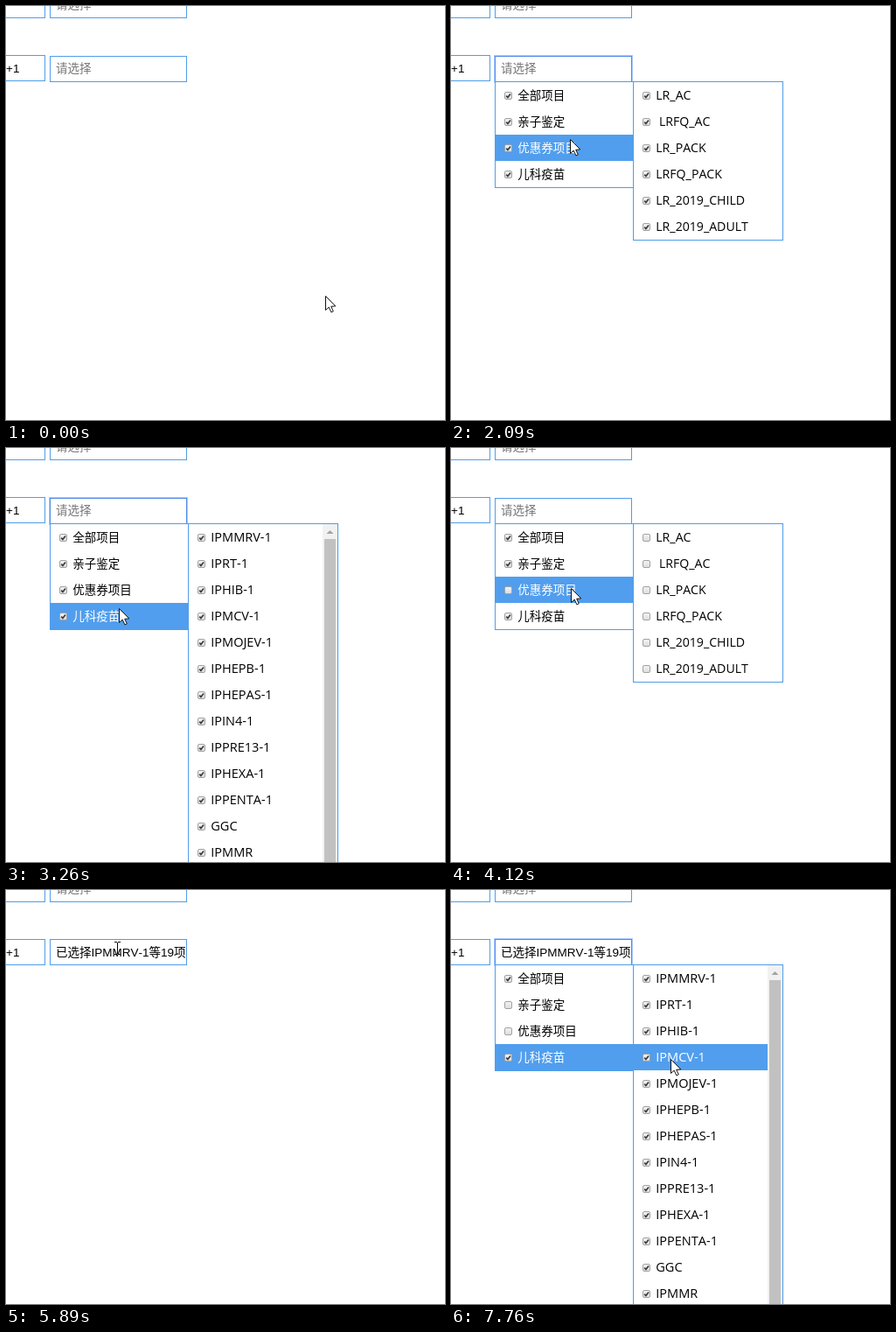
Animation, 502 px wide and 473 px high, one loop 8000 ms. Source, as an HTML page with a canvas:

```html
<!DOCTYPE html>
<html lang="zh">
<head>
<meta charset="utf-8">
<style>
html, body { margin: 0; width: 100%; height: 100%; overflow: hidden; background: #fff; }
canvas { display: block; }
</style>
</head>
<body>
<canvas id="stage" width="502" height="473"></canvas>
<script>
const ctx = document.getElementById('stage').getContext('2d');
const LOOP = 8000, STEP = 78, TICK = 10, PRESS = 160;
const WIDTH = 502, HEIGHT = 473, ROW = 30, LEFT = 50, SPLIT = 208;
const BLUE = '#509de9', HOVER = '#519eee';
const CJK = '"Noto Sans CJK SC", "Noto Sans CJK", sans-serif';
const MENU_FONT = '13.5px ' + CJK;
const INPUT_FONT = '13.5px "Liberation Sans", ' + CJK;
const LIST_FONT = '14.5px "Open Sans", "Noto Sans", sans-serif';
const CODE_FONT = LIST_FONT.replace('14.5', '14.1');

const groups = [
  { name: '全部项目' },
  { name: '亲子鉴定', font: LIST_FONT, items: ['PAT-B-1+1', 'PAT-H-1+1', 'PAT-B', 'PAT-B-SAB', 'PAT-H-SAB'] },
  { name: '优惠券项目', font: CODE_FONT,
    items: ['LR_AC', ' LRFQ_AC', 'LR_PACK', 'LRFQ_PACK', 'LR_2019_CHILD', 'LR_2019_ADULT'] },
  { name: '儿科疫苗', font: LIST_FONT, scroll: true,
    items: ['IPMMRV-1', 'IPRT-1', 'IPHIB-1', 'IPMCV-1', 'IPMOJEV-1', 'IPHEPB-1', 'IPHEPAS-1',
      'IPIN4-1', 'IPPRE13-1', 'IPHEXA-1', 'IPPENTA-1', 'GGC', 'IPMMR'] }
];

// The pointer's journey; everything else follows from where it is and when it clicks.
const moves = [];
function move(from, to, x, y, click) {
  moves.push({ from, to, x, y, click, start: moves.at(-1) || { x: 365, y: 331 } });
}
move(0, 680, 127, 75, 920);
move(1150, 1290, 135, 113);
move(1290, 1460, 141, 139);
move(1460, 1600, 220, 142);
move(1600, 1700, 238, 188);
move(1700, 1940, 142, 138);
move(2010, 2090, 136, 152);
move(2090, 2250, 182, 148);
move(2640, 2720, 133, 148);
move(2790, 2950, 133, 135);
move(2950, 3110, 134, 160);
move(3180, 3260, 129, 183);
move(3570, 3650, 137, 160, 4110);
move(4110, 4260, 138, 132, 4500);
move(4570, 4820, 136, 257, 5130);
move(5130, 5730, 127, 66, 6060);
move(6430, 6670, 157, 121);
move(6750, 7080, 185, 190);
move(7080, 7760, 251, 193);

function pointerAt(t) {
  const { from, to, x, y, start } = moves.findLast(m => m.from <= t);
  const steps = Math.round((to - from) / STEP);
  const k = Math.min(1, Math.floor((t - from) / (to - from) * steps) / steps);
  return { x: Math.round(start.x + (x - start.x) * k), y: Math.round(start.y + (y - start.y) * k) };
}

const inputTop = ui => ui.picked ? 56 : 57;
const menuTop = ui => inputTop(ui) + 29;
const rowAt = (ui, y) => Math.floor((y - menuTop(ui) - 1) / ROW);

function overInput(ui, { x, y }) {
  return x >= LEFT && x < 207 && y >= inputTop(ui) && y < menuTop(ui);
}

function point(ui, { x, y }) {
  const row = rowAt(ui, y);
  if (!ui.open || row < 0) return;
  if (x >= SPLIT) {
    if (groups[ui.hover]?.items?.[row]) ui.hot[ui.hover] = row;
  } else if (x >= LEFT && row < groups.length) ui.hover = row;
}

function release(ui, pointer) {
  if (overInput(ui, pointer)) ui.open = true;
  else if (rowAt(ui, pointer.y) < groups.length) ui.off.add(ui.hover);
  else Object.assign(ui, { open: false, picked: true, hover: -1 });
}

// Replays the interaction from the start of the loop up to time t.
function replay(t) {
  const ui = { open: false, focus: false, picked: false, pressed: false, hover: -1, hot: {}, off: new Set() };
  for (let s = 0; ; s = Math.min(s + TICK, t)) {
    const pointer = ui.pointer = pointerAt(s);
    const pressed = moves.some(m => m.click && s >= m.click - PRESS && s < m.click);
    if (pressed) ui.focus = overInput(ui, pointer);
    else if (ui.pressed) release(ui, pointer);
    ui.pressed = pressed;
    point(ui, pointer);
    if (s >= t) return ui;
  }
}

function fill(color, x, y, w, h) {
  ctx.fillStyle = color;
  ctx.fillRect(x, y, w, h);
}

function outline(color, x, y, w, h) {
  ctx.strokeStyle = color;
  ctx.lineWidth = 1;
  ctx.strokeRect(x + .5, y + .5, w - 1, h - 1);
}

function box(x, y, w, h) {
  fill('#fff', x, y, w, h);
  outline(BLUE, x, y, w, h);
}

function label(text, x, y, font, color) {
  ctx.font = font;
  ctx.fillStyle = color;
  ctx.fillText(text, x, y);
}

function checkbox(x, y, checked) {
  const shade = ctx.createLinearGradient(0, y, 0, y + 9);
  shade.addColorStop(0, '#f4f4f4');
  shade.addColorStop(1, '#dcdcdc');
  ctx.fillStyle = shade;
  ctx.strokeStyle = '#a2a2a2';
  ctx.lineWidth = 1;
  ctx.beginPath();
  ctx.roundRect(x + .5, y + .5, 8, 8, 1.5);
  ctx.fill();
  ctx.stroke();
  if (!checked) return;
  ctx.strokeStyle = '#3c3c3c';
  ctx.lineWidth = 1.7;
  ctx.beginPath();
  ctx.moveTo(x + 2.2, y + 4.6);
  ctx.lineTo(x + 3.9, y + 6.4);
  ctx.lineTo(x + 7, y + 2.4);
  ctx.stroke();
}

function rows(names, x, top, w, font, hot, isChecked) {
  names.forEach((name, i) => {
    const y = top + 1 + i * ROW;
    if (i === hot) fill(HOVER, x + 1, y, w, ROW);
    checkbox(x + 11, y + 11, isChecked(i));
    label(name, x + 26.3, y + 20, font, i === hot ? '#fff' : '#000');
  });
}

function scrollbar(top) {
  fill('#f1f1f1', 362, top + 1, 17, HEIGHT);
  fill('#c1c1c1', 364, top + 18, 13, HEIGHT);
  ctx.fillStyle = '#a3a3a3';
  ctx.beginPath();
  ctx.moveTo(366.5, top + 12);
  ctx.lineTo(370.5, top + 8);
  ctx.lineTo(374.5, top + 12);
  ctx.fill();
}

function inputs(ui) {
  const top = inputTop(ui);
  box(-20, -16, 65, 30);
  box(LEFT, -16, 157, 30);
  label('请选择', 57, 3, INPUT_FONT, '#757575');
  box(-20, 56, 65, 30);
  label('+1', 0, 76, INPUT_FONT, '#000');
  box(LEFT, top, 157, 30);
  if (ui.focus) {
    outline('#4d8ae8', LEFT, top, 157, 30);
    outline('rgba(77,144,254,.45)', LEFT - 1, top - 1, 159, 32);
  }
  const text = ui.picked ? '已选择IPMMRV-1等19项' : '请选择';
  label(text, 57, 76, INPUT_FONT, ui.picked ? '#000' : '#757575');
}

function menus(ui) {
  const top = menuTop(ui);
  box(LEFT, top, 159, groups.length * ROW + 2);
  rows(groups.map(g => g.name), LEFT, top, 157, MENU_FONT, ui.hover, i => !ui.off.has(i));
  const { items, font, scroll } = groups[ui.hover] || {};
  if (!items) return;
  box(SPLIT, top, 172, scroll ? HEIGHT : items.length * ROW + 2);
  rows(items, SPLIT, top, scroll ? 153 : 170, font, ui.hot[ui.hover], () => !ui.off.has(ui.hover));
  if (scroll) scrollbar(top);
}

function arrow(x, y) {
  const shape = [[0, 0], [0, 16], [3.7, 12.6], [6.4, 18.4], [8.8, 17.3], [6.2, 11.8], [11.3, 11.4]];
  ctx.beginPath();
  shape.forEach(([dx, dy]) => ctx.lineTo(x + .5 + dx, y + .5 + dy));
  ctx.closePath();
  ctx.fillStyle = '#fff';
  ctx.fill();
  ctx.strokeStyle = '#111';
  ctx.lineWidth = 1;
  ctx.stroke();
}

function ibeam(x, y) {
  fill('#000', x, y - 6, 1, 13);
  for (const dy of [-7, 7]) {
    fill('#000', x - 3, y + dy, 3, 1);
    fill('#000', x + 1, y + dy, 3, 1);
  }
}

function halo(x, y) {
  ctx.fillStyle = 'rgba(255,255,0,.5)';
  ctx.beginPath();
  ctx.arc(x, y, 12, 0, Math.PI * 2);
  ctx.fill();
}

function draw(t) {
  const ui = replay(t), { x, y } = ui.pointer;
  fill('#fff', 0, 0, WIDTH, HEIGHT);
  inputs(ui);
  if (ui.open) menus(ui);
  if (ui.pressed) halo(x, y);
  (overInput(ui, ui.pointer) ? ibeam : arrow)(x, y);
}

ctx.fontKerning = 'none';
const start = performance.now();
function tick() {
  draw((performance.now() - start) % LOOP);
  requestAnimationFrame(tick);
}
tick();
</script>
</body>
</html>
```
